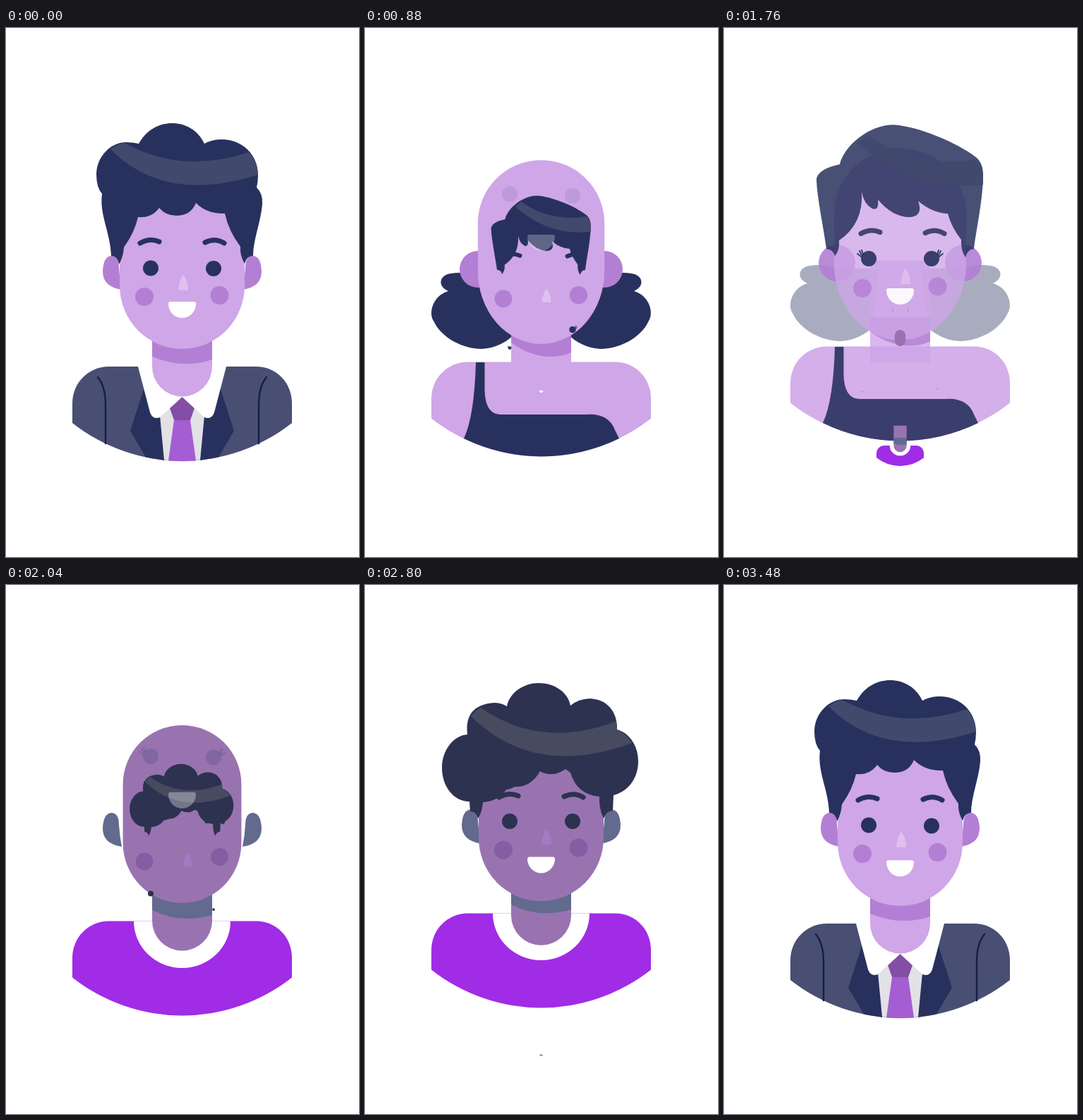
Recreate the animation shown at these times as an HTML page with a canvas. Size 500x750 px, loop 3520 ms.

```html
<!DOCTYPE html>
<html lang="en">
<head>
<meta charset="utf-8">
<title>Changing portraits</title>
<style>
html, body { margin: 0; width: 100%; height: 100%; overflow: hidden; background: #fff; }
canvas { display: block; }
</style>
</head>
<body>
<canvas width="500" height="750"></canvas>
<script>
const ctx = document.querySelector('canvas').getContext('2d');
const LOOP = 3520, FIRST = 240, STEP = 1200, MID = 249.5;

const clamp = u => Math.min(1, Math.max(0, u));
const span = (p, start, length) => clamp((p - start) / length);
const smooth = u => u * u * (3 - 2 * u);
const cubic = u => u < .5 ? 4 * u ** 3 : 1 - 4 * (1 - u) ** 3;

// Shape helpers
const fill = (color, d) => ({ color, path: new Path2D(d) });
const line = (color, width, d) => ({ ...fill(color, d), width });
const both = shape => {
  const path = new Path2D(shape.path);
  path.addPath(shape.path, new DOMMatrix([-1, 0, 0, 1, 2 * MID, 0]));
  return { ...shape, path };
};
const shift = (shape, x, y) => {
  const path = new Path2D();
  path.addPath(shape.path, new DOMMatrix([1, 0, 0, 1, x, y]));
  return { ...shape, path };
};
const disc = (color, x, y, r) =>
  fill(color, `M${x - r} ${y}a${r} ${r} 0 1 1 ${2 * r} 0a${r} ${r} 0 1 1 ${-2 * r} 0Z`);
const part = (x, y, ...shapes) => ({ x, y, shapes });

const torso = (color, y) => shift(fill(color,
  'M94 560V532C94 503 117 480 146 480H354C383 480 405 503 405 532V560A251 251 0 0 1 94 560Z'), 0, y);

const skull = (color, left, top, jaw, chin) => {
  const right = 2 * MID - left, r = MID - left;
  return fill(color, `M${left} ${jaw}V${top + r}A${r} ${r} 0 0 1 ${right} ${top + r}` +
    `V${jaw}A${r} ${chin - jaw} 0 0 1 ${left} ${jaw}Z`);
};

const slimEars = color => both(fill(color,
  'M164 371Q137 367 137 345Q138 323 150 323Q160 324 160 340Q161 356 164 371Z'));

// Features placed by a few heights
function features(o) {
  const nose = fill(o.nose,
    'M251 350Q258 358 258 370Q258 372 256 372H247Q244 372 244 370Q246 356 251 350Z');
  const mouth = fill('#fff',
    'M233 388H266Q269 388 269 391A19.5 20 0 0 1 230 391Q230 388 233 388Z');
  const [bx1, bx2, by] = o.brow;
  const lash = line(o.dark, 2, 'M197 327L195 321M195 328L192 322M194 330L189 326');
  const mirrored = shift({ ...lash, path: both(lash).path }, 0, 0);
  const lashes = o.lashes ? [mirrored] : [];
  const eye = (x, y) => part(x, y, disc(o.dark, x, y, 11));
  const left = eye(205, o.eyes[0]), right = eye(294, o.eyes[1]);
  if (lashes.length) {
    left.shapes.push(lash);
    right.shapes.push(line(o.dark, 2, 'M302 327L304 321M304 328L307 322M305 330L310 326'));
  }
  return {
    cheekL: part(196, o.cheeks[0], disc(o.cheek, 196, o.cheeks[0], 13)),
    cheekR: part(302.5, o.cheeks[1], disc(o.cheek, 302.5, o.cheeks[1], 13)),
    nose: part(251 + o.noseAt[0], 361 + o.noseAt[1], shift(nose, ...o.noseAt)),
    browL: part(bx1 + 14, by - 2, line(o.dark, 7, `M${bx1} ${by}q14 -8 27 -2`)),
    browR: part(bx2 + 14, by - 2, line(o.dark, 7, `M${bx2} ${by - 1}q14 -7 27 1`)),
    eyeL: left,
    eyeR: right,
    mouth: part(MID, 399 + o.mouthAt, shift(mouth, 0, o.mouthAt))
  };
}

const NAVY = '#28315d', SKIN = '#cfa6e8', SHADE = '#b37fd4';
const INK = '#2d3250', DEEP = '#9973b0', SLATE = '#626a8e';

const suited = {
  body: part(MID, 545,
    torso('#494f73', 0),
    both(fill(NAVY, 'M195 512L176 571L198 608.5L224 613L218 540Z')),
    fill('#e1e1e6', 'M218 550L249.5 523L281 550L275 612.5Q250 615 224 612.5Z'),
    fill('#a45dd2', 'M238 556H261L269 613.5Q250 615 230 613.5Z'),
    fill('#834fa6', 'M249.5 523L267 539L261 556H238L232 539Z'),
    fill('#fff', 'M187 480L207 473H292L312 480L295 545Q291 556 281 552L249.5 523L218 552Q208 556 204 545Z'),
    both(line('#151d48', 2.4, 'M130 495Q141 508 141 535V589'))),
  neck: part(MID, 545,
    fill(SKIN, 'M207 345H292V480A42.5 42.5 0 0 1 207 480Z'),
    fill(SHADE, 'M207 430V466Q232 476 255 476Q275 476 292 470V430Z')),
  ears: part(MID, 345, slimEars(SHADE)),
  face: part(MID, 455, skull(SKIN, 161, 190, 365, 455)),
  hair: part(MID, 383,
    fill(NAVY, `M149 323C148 290 132 265 136 235Q128 226 128 207C129 180 150 162 170 162
      Q180 162 188 164C200 143 218 135 235 135C255 135 272 145 281 164C290 159 298 158 306 158
      C335 158 357 180 357 208Q357 218 355 226Q364 235 363 250C361 275 350 300 350 323
      Q341 323 338 334Q331 322 332 310Q315 287 310 263Q285 264 269 248Q262 266 241 266
      Q226 266 217 255Q206 270 187 268Q182 290 167 311Q166 325 160 335Q158 323 149 323Z`),
    fill('#41496d', 'M148 172Q158 164 168 163Q250 208 344 176Q356 190 357 208Q225 250 148 172Z')),
  ...features({ dark: NAVY, cheek: SHADE, nose: '#dec1ee', cheeks: [381, 379], noseAt: [0, 0],
    brow: [190, 282, 305], eyes: [340.5, 341], mouthAt: 0 })
};

const pigtailed = {
  back: part(MID, 420, both(fill(NAVY,
    `M157 352Q140 345 122 348C105 350 102 366 118 373C95 380 90 405 97 415
     C108 440 140 455 165 455C185 454 200 445 210 436L220 352Z`))),
  body: part(MID, 545,
    torso(SKIN, -6.5),
    fill(NAVY, 'M157 474H169.5V513Q170 547.5 192 548H312Q345 545 354 570L360 582A251 251 0 0 1 140 582Q155 550 157 474Z')),
  neck: part(MID, 545,
    fill(SKIN, 'M207 345H292V490H207Z'),
    fill(SHADE, 'M207 425V446Q235 466 263 466Q278 466 292 460V425Z')),
  ears: part(MID, 342, both(disc(SHADE, 160, 342, 26))),
  face: part(MID, 448, skull(SKIN, 156, 176, 340, 448)),
  hair: part(MID, 383,
    fill(NAVY, `M145 316C142 290 131 240 131 216Q135 202 164 196C170 170 205 140 240 140
      C275 142 330 165 357 186Q368 195 367 215C366 250 357 290 354 316Q345 316 342 328
      Q335 317 336 303Q322 285 317 266Q295 265 275 248Q283 270 262 271Q238 270 218 246
      Q220 262 210 259Q198 252 195 235Q198 280 163 304Q164 318 157 326Q154 316 145 316Z`),
    fill('#41496d', 'M188 166L202 154Q270 203 357 189Q368 195 367 225Q270 238 188 166Z')),
  ...features({ dark: NAVY, cheek: SHADE, nose: '#dec1ee', cheeks: [371.5, 369.5], noseAt: [6, -9],
    brow: [194, 285, 295], eyes: [333, 333], mouthAt: -12.5, lashes: true })
};

const curly = {
  body: part(MID, 545,
    torso('#a02ce6', -3.5),
    fill('#fff', 'M181 476.5H318A68.5 66.5 0 0 1 181 476.5Z')),
  neck: part(MID, 545,
    fill(DEEP, 'M207 345H292V476A42.5 42.5 0 0 1 207 476Z'),
    fill(SLATE, 'M207 425V461Q232 473 255 473Q275 473 292 468V425Z')),
  ears: part(MID, 345, slimEars(SLATE)),
  face: part(MID, 451, skull(DEEP, 161, 185, 361, 451)),
  hair: part(MID, 383,
    fill(INK, `M149 321L148 307C125 307 109 285 109 259C109 235 125 213 145 212
      Q140 170 183 167Q193 167 201 172C205 152 225 139 246 139C268 139 288 152 291 171
      Q303 161 319 161C343 162 358 180 357 205C375 210 387 228 387 250C387 275 372 293 352 298
      L351 320Q342 320 338 331Q331 317 332 300Q300 297 291 266L284 261Q265 274 248 264
      Q235 287 212 286Q205 290 200 290Q190 306 167 308Q166 322 160 331Q157 320 149 321Z`),
    fill('#474b60', 'M150 186Q156 178 164 174Q250 234 356 193L357 205Q370 211 378 224Q240 275 150 186Z')),
  ...features({ dark: INK, cheek: '#865ca3', nose: '#a37bc4', cheeks: [377, 374], noseAt: [6, -4],
    brow: [190, 282, 301], eyes: [335, 335], mouthAt: -2 })
};

const people = [suited, pigtailed, curly];

// Arrival: start, length, rise from below
const ENTER = {
  back: [200, 400, 60], ears: [200, 400, 60], face: [160, 575, 0],
  cheekL: [200, 520, 144], cheekR: [195, 510, 144], nose: [330, 400, 144],
  hair: [396, 400, 0], browL: [335, 400, 144], browR: [335, 400, 144],
  eyeL: [420, 400, 144], eyeR: [420, 400, 144], mouth: [480, 400, 144]
};

// Departure: share of the first lift, later rise, fade start and end
const LEAVE = {
  back: [.5, 0, 200, 400], body: [1, 0, 300, 480], neck: [.7, 0, 280, 480],
  ears: [.4, 0, 300, 500], face: [.25, 0, 270, 500],
  cheekL: [.12, 0, 280, 500], cheekR: [.14, 0, 280, 500], nose: [0, 0, 280, 500],
  hair: [0, 50, 280, 540], browL: [0, 60, 280, 520], browR: [0, 60, 280, 520],
  eyeL: [0, 105, 280, 680], eyeR: [0, 103, 280, 680], mouth: [.05, 94, 280, 760]
};

function paint(item, dy, scale, alpha) {
  if (scale < .005 || alpha <= 0) return;
  ctx.save();
  ctx.globalAlpha = alpha;
  ctx.translate(item.x, item.y + dy);
  ctx.scale(scale, scale);
  ctx.translate(-item.x, -item.y);
  for (const { color, path, width } of item.shapes) {
    if (width) {
      ctx.strokeStyle = color;
      ctx.lineWidth = width;
      ctx.stroke(path);
    } else {
      ctx.fillStyle = color;
      ctx.fill(path);
    }
  }
  ctx.restore();
}

function render(time) {
  let t = Math.floor(time % LOOP / 40) * 40;
  if (t < FIRST) t += LOOP;
  const n = Math.min(2, Math.floor((t - FIRST) / STEP));
  const p = t - FIRST - n * STEP;
  const next = (n + 1) % 3;
  const wait = n ? 0 : 100;
  const lift = 22 * smooth(span(p, wait, 320 - wait));

  const leave = (...names) => names.forEach(name => {
    const item = people[n][name];
    if (!item) return;
    const [share, rise, from, to] = LEAVE[name];
    const dy = -share * lift - rise * span(p, 280, 360) ** 1.3;
    paint(item, dy, 1, 1 - span(p, from, to - from));
  });

  const enter = (...names) => names.forEach(name => {
    const item = people[next][name];
    if (!item) return;
    if (name === 'body' || name === 'neck') {
      const u = span(p, 150, 450);
      const least = next === 0 && u > 0 ? .013 : 0;
      paint(item, 126 * (1 - u) ** 1.5, Math.max(least, cubic(u)), 1);
      return;
    }
    const [start, length, rise] = ENTER[name];
    const late = name === (next === 1 ? 'eyeL' : 'eyeR') ? 40 : 0;
    const delay = late + (next === 1 ? 30 : 0);
    const s = cubic(span(p, start + delay, length));
    paint(item, rise * (1 - s) ** .75, s, 1);
  });

  ctx.fillStyle = '#fff';
  ctx.fillRect(0, 0, 500, 750);
  leave('back');
  enter('back');
  leave('body', 'neck');
  enter('body', 'neck');
  leave('ears');
  enter('ears');
  leave('face', 'cheekL', 'cheekR', 'nose', 'hair');
  enter('face', 'cheekL', 'cheekR', 'nose', 'hair', 'browL', 'browR', 'eyeL', 'eyeR', 'mouth');
  leave('browL', 'browR', 'eyeL', 'eyeR', 'mouth');
}

ctx.lineCap = 'round';
const begin = performance.now();
function tick() {
  render(performance.now() - begin);
  requestAnimationFrame(tick);
}
tick();
</script>
</body>
</html>
```
